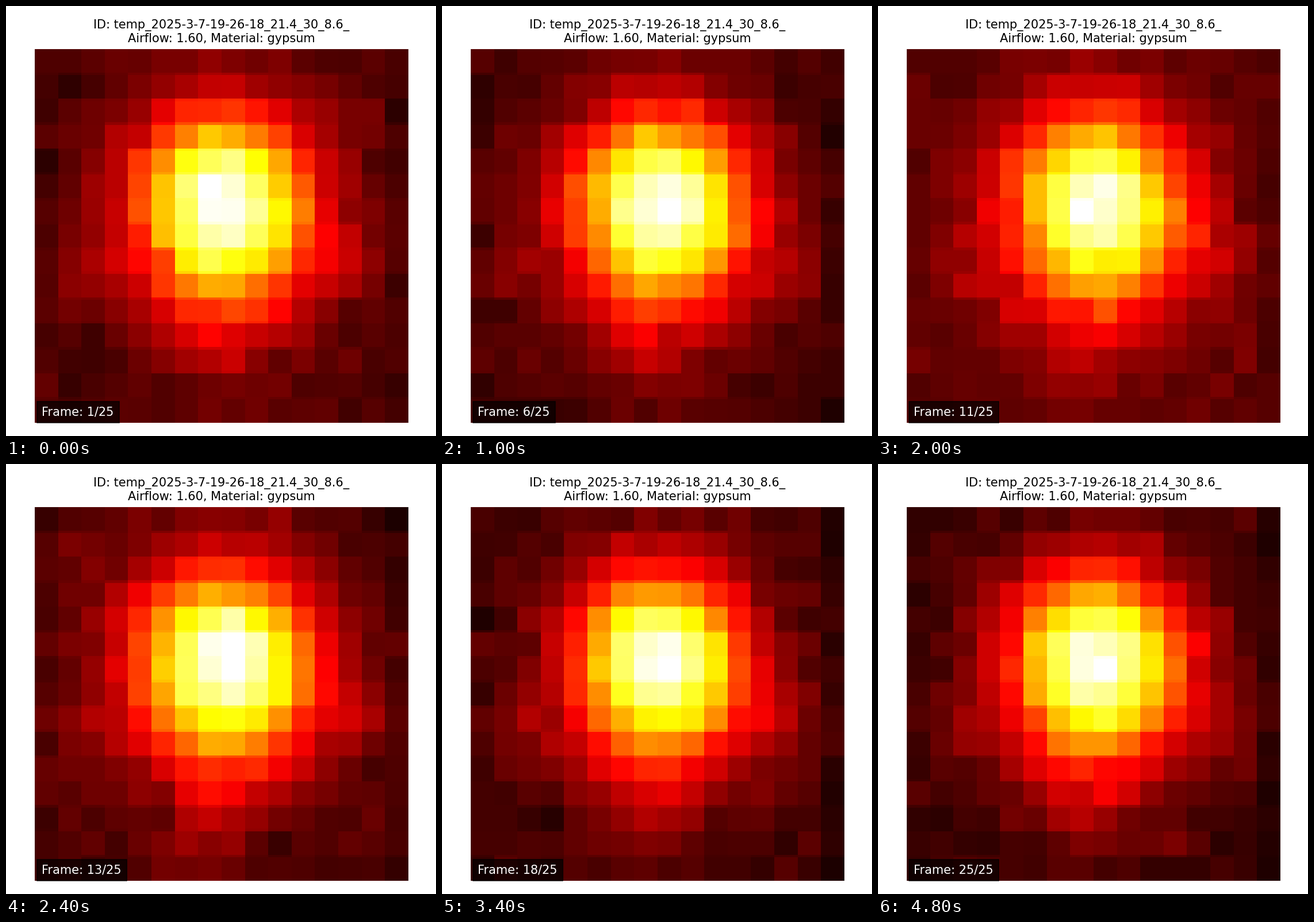
Recreate the animation shown at these times as a matplotlib script. Size 748 by 748 pixels, loop 5 s.

```python
import numpy as np
import matplotlib.pyplot as plt
from matplotlib.animation import FuncAnimation

SIZE, DPI = 748, 125
ROWS, COLS, LINES = 15, 16, 143
FRAMES, INTERVAL = 25, 200
LEFT, TOP, SIDE = 49.5, 75.4, 650

# Background warmth over the loop: a few key moments, interpolated.
LEVEL_FRAMES = [0, 3, 7, 10, 14, 20, 24]
LEVELS = [.10, .10, .085, .125, .08, .075, .075]

# Small warm patches beside the main plume: row, column, strength.
PATCHES = [(8.5, 1.5, .07), (8.2, 13, .1), (12, 7, .06), (6.8, 10, .05)]

row, col = np.mgrid[:ROWS, :COLS]


def bump(center_row, center_col, row_spread, col_spread):
    return np.exp(-.5 * (((row - center_row) / row_spread) ** 2
                         + ((col - center_col) / col_spread) ** 2))


def plume():
    """Heat above the background: one bump with a longer lower tail."""
    field = .9 * bump(5.6, 7.6, np.where(row < 5.6, 2.53, 3.15), 2.65)
    for center_row, center_col, strength in PATCHES:
        field += strength * bump(center_row, center_col, 1, 1)
    field[:, -1] -= .025
    return field


def line_weights():
    """Area-averaging weights that spread the sensor rows over the lines."""
    step = ROWS / LINES
    start = np.arange(LINES)[:, None] * step
    cell = np.arange(ROWS)
    overlap = np.minimum(start + step, cell + 1) - np.maximum(start, cell)
    return np.clip(overlap, 0, None) / step


PLUME = plume()
WEIGHTS = line_weights()


def heat(frame):
    rng = np.random.default_rng(700 + frame)
    level = np.interp(frame, LEVEL_FRAMES, LEVELS)
    field = PLUME + level + rng.normal(0, .02, PLUME.shape)
    return WEIGHTS @ np.clip(field / field.max(), 0, 1)


plt.rcParams["font.family"] = "DejaVu Sans"
fig = plt.figure(figsize=(SIZE / DPI, SIZE / DPI), dpi=DPI, facecolor="white")
ax = fig.add_axes([LEFT / SIZE, 1 - (TOP + SIDE) / SIZE,
                   SIDE / SIZE, SIDE / SIZE])
ax.axis("off")
image = ax.imshow(heat(0), cmap="hot", vmin=0, vmax=1,
                  interpolation="nearest", aspect="auto")
ax.set_title("ID: temp_2025-3-7-19-26-18_21.4_30_8.6_\n"
             "Airflow: 1.60, Material: gypsum", fontsize=12, pad=7)
label = ax.text(.02, .02, "", transform=ax.transAxes, color="white",
                fontsize=12, bbox=dict(facecolor="black", alpha=.7, pad=5))


def update(frame):
    image.set_data(heat(frame))
    label.set_text(f"Frame: {frame + 1}/{FRAMES}")
    return image, label


anim = FuncAnimation(fig, update, frames=FRAMES, interval=INTERVAL,
                     repeat=True, repeat_delay=0)
plt.show()
```
